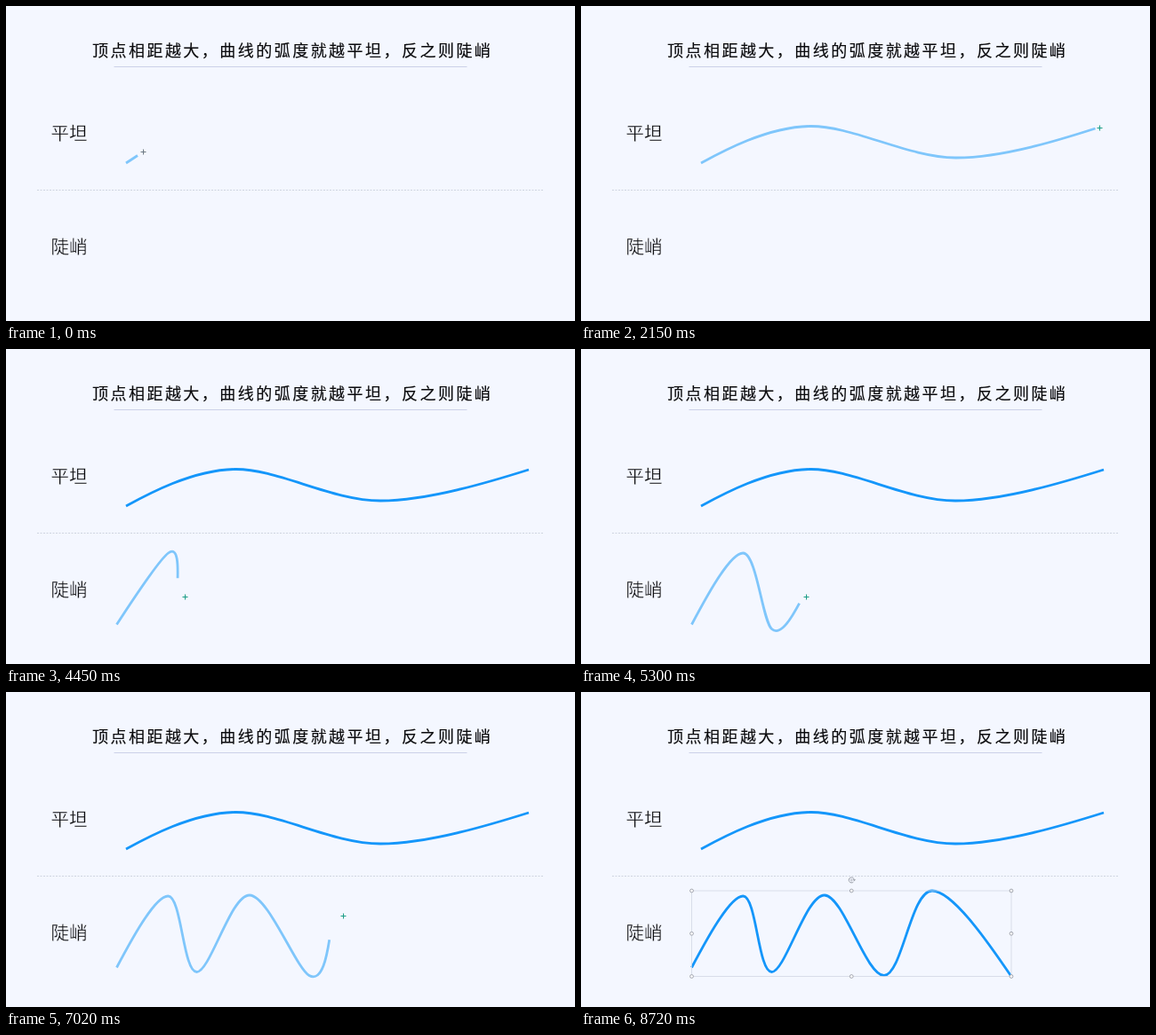
An HTML page for the animation above (9120 ms loop, 640 px wide and 355 px high).

```html
<!DOCTYPE html>
<html lang="zh-CN">
<head>
<meta charset="utf-8">
<title>曲线的弧度</title>
<style>
html, body { margin: 0; width: 100%; height: 100%; overflow: hidden; background: #f4f7ff; }
svg { display: block; width: 640px; height: 355px; }
text { font-family: "Noto Sans CJK SC", "Noto Sans CJK", sans-serif; fill: #0a0a0c; }
.title { font-size: 18px; font-weight: 500; letter-spacing: 2.47px; stroke: #0a0a0c; stroke-width: .15; }
.label { font-size: 20.5px; font-weight: 300; stroke: #f4f7ff; stroke-width: .35; }
.curve { fill: none; stroke-width: 2.8; }
</style>
</head>
<body>
<svg viewBox="0 0 640 355">
  <text class="title" x="97" y="57">顶点相距越大，曲线的弧度就越平坦，反之则陡峭</text>
  <path d="M121.5 68.5H518.5" stroke="#cbd1e8"/>
  <path d="M35 207.5H605" stroke="#ced4df" stroke-dasharray="2 1.5"/>
  <text class="label" x="50.5" y="150.5">平坦</text>
  <text class="label" x="50.5" y="278.5">陡峭</text>
  <path id="flat" class="curve"/>
  <path id="steep" class="curve"/>
  <g id="box"></g>
  <path id="cross" d="M-3 0H3M0 -3V3"/>
</svg>
<script>
const LOOP = 9120, STEP = 77.2, LEAD = 28, SWITCH = 39, DRIFT = true;
const $ = id => document.getElementById(id);

// Stops of the pointer: [step, x, y]. It eases to each and clicks there,
// except for drift stops, which it reaches at constant speed without a click.
const flat = {
  el: $('flat'), from: -1, done: 35, release: SWITCH,
  stops: [[-3, 135, 177], [1, 161, 160, DRIFT], [7, 257, 135.5], [19, 421, 171], [32, 588, 136]]
};
const steep = {
  el: $('steep'), from: 42, done: 105, release: Infinity,
  stops: [[41, 124.5, 310.5], [47, 168, 241, DRIFT], [56, 182.5, 230], [64, 214.5, 315.5],
    [75, 300, 236, DRIFT], [81, 274, 229], [89, 341, 319.5], [95, 395, 224], [103, 484, 320.5],
    [108, 484, 320.5, DRIFT], [113, 640, 370, DRIFT]]
};
for (const c of [flat, steep]) c.clicks = c.stops.filter(s => !s[3]);

const mix = (a, b, k) => a.map((v, i) => v + (b[i] - v) * k);
const point = stop => stop.slice(1, 3);

function pointer({ stops }, n) {
  const i = stops.findIndex(s => s[0] > n);
  if (i < 1) return point(i ? stops[stops.length - 1] : stops[0]);
  const a = stops[i - 1], b = stops[i];
  const u = (n - a[0]) / (b[0] - a[0]);
  return mix(point(a), point(b), b[3] ? u : 1 - (1 - u) ** 3);
}

// Smooth curve through the points; free ends lean toward the neighbouring handle
function spline(p) {
  const last = p.length - 1;
  const handle = (i, side) => i > 0 && i < last
    ? p[i].map((v, k) => v + side * (p[i + 1][k] - p[i - 1][k]) / 6) : null;
  let d = 'M' + p[0];
  for (let i = 0; i < last; i++) {
    let a = handle(i, 1), b = handle(i + 1, -1);
    a = a || mix(p[i], b || p[i + 1], 1 / 3);
    b = b || mix(p[i + 1], a, 1 / 3);
    d += `C${a} ${b} ${p[i + 1]}`;
  }
  return d;
}

function selection({ x, y, width, height }) {
  let s = `<rect x="${x}" y="${y}" width="${width}" height="${height}" fill="none" stroke="#d3d8e4" stroke-width=".8"/>`;
  for (const i of [0, .5, 1]) for (const j of [0, .5, 1]) {
    if (i !== .5 || j !== .5)
      s += `<circle cx="${x + i * width}" cy="${y + j * height}" r="1.9" fill="#fff" stroke="#9a9ea8" stroke-width=".9"/>`;
  }
  return s + `<g transform="translate(${x + width / 2} ${y - 12})" fill="none" stroke="#999da6">
    <path d="M2.2 2A3 3 0 1 1 3 -.4"/><path d="M1.4 -.8H4.8L3.1 1.2Z" fill="#999da6" stroke="none"/>
    <circle r="1" stroke-width=".6"/></g>`;
}

// The end of the line trails the pointer by one step
function drawCurve(c, n) {
  let d = '';
  if (n >= c.from) {
    const pts = c.clicks.filter(s => s[0] < n - 1).map(point);
    if (pts.length < c.clicks.length) {
      if (!pts.length) pts.push(point(c.clicks[0]));
      pts.push(pointer(c, n - 1));
    }
    d = spline(pts);
  }
  c.el.setAttribute('d', d);
  c.el.setAttribute('stroke', n < c.done ? '#7fc6fb' : '#1496fa');
  return n >= c.done && n < c.release ? selection(c.el.getBBox()) : '';
}

function draw(n) {
  $('box').innerHTML = drawCurve(flat, n) + drawCurve(steep, n);
  const [x, y] = pointer(n < SWITCH ? flat : steep, n).map(v => Math.floor(v) + .5);
  const cross = $('cross');
  cross.setAttribute('transform', `translate(${x} ${y})`);
  cross.setAttribute('stroke', n < 20 ? '#6b7883' : n > 75 && n < 90 ? '#3a3f44' : '#1a9c86');
}

let begin, shown = 0;
function tick(now) {
  begin ??= now;
  const n = Math.floor(((now - begin) % LOOP + LEAD) / STEP);
  if (n !== shown) draw(shown = n);
  requestAnimationFrame(tick);
}
draw(0);
requestAnimationFrame(tick);
</script>
</body>
</html>
```
